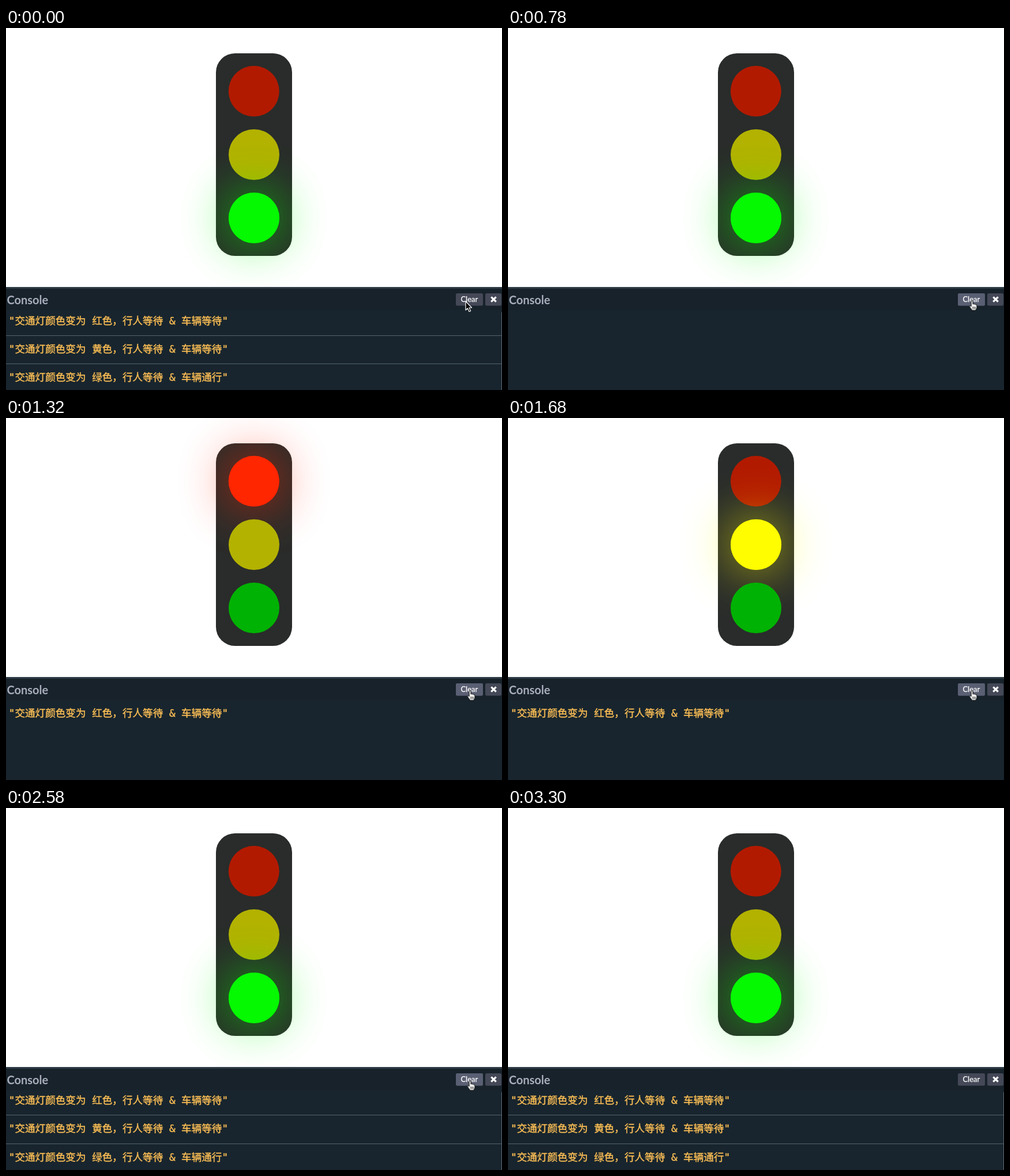
Write an HTML page that moves like this. It is 860 px wide and 629 px high and loops after 3.36 s.

```html
<!DOCTYPE html>
<html lang="zh-CN">
<head>
<meta charset="utf-8">
<title>交通灯</title>
<style>
  html, body { margin: 0; width: 100%; height: 100%; overflow: hidden; background: #fff; }
  svg { display: block; width: 860px; height: 629px; }

  .lamp circle { r: 44px; }
  .halo { filter: blur(44px); opacity: .75; }
  .red { fill: #ff2600; }
  .yellow { fill: #fffd00; }
  .green { fill: #05f900; }
  .off-red { fill: #b21a00; }
  .off-yellow { fill: #b3b200; }
  .off-green { fill: #00b203; }

  .title { font: 700 20px Lato, sans-serif; fill: #aaaebc; }
  .label { font: 400 13px Lato, sans-serif; fill: #fff; stroke: #fff; stroke-width: .25px; }
  .log text {
    font: 17.6px "DejaVu Sans Mono", "Noto Sans CJK SC", "Noto Sans CJK", monospace;
    fill: #f9bd55; stroke: #f9bd55; stroke-width: .4px;
  }
  .log .rule { fill: #55636c; }

  /* Every change is a hard cut; percentages are multiples of 60 ms in 3360 ms. */
  .cut { animation: 3360ms step-end infinite; }
  #red-on { animation-name: red-on; }
  #yellow-on { animation-name: yellow-on; }
  #green-on { animation-name: green-on; }
  #log1 { animation-name: log1; }
  #log2 { animation-name: log2; }
  #log3 { animation-name: log3; }
  #scroll { animation-name: scroll; }
  #hover { animation-name: hover; }
  #arrow { animation-name: arrow; }
  #hand { animation-name: hand; }

  @keyframes red-on { 0%, 50% { visibility: hidden } 25% { visibility: visible } }
  @keyframes yellow-on { 0%, 76.786% { visibility: hidden } 50% { visibility: visible } }
  @keyframes green-on { 0%, 76.786% { visibility: visible } 25% { visibility: hidden } }
  @keyframes log1 { 0%, 26.786% { visibility: visible } 8.929% { visibility: hidden } }
  @keyframes log2 { 0%, 51.786% { visibility: visible } 8.929% { visibility: hidden } }
  @keyframes log3 { 0%, 76.786% { visibility: visible } 8.929% { visibility: hidden } }
  @keyframes scroll {
    0% { transform: translateY(-4px) }
    8.929% { transform: none }
    76.786%, 100% { transform: translateY(-5px) }
  }
  @keyframes hover { 0%, 92.857% { visibility: hidden } 1.786% { visibility: visible } }
  @keyframes arrow {
    0% { visibility: visible; transform: translate(797px, 475px) }
    1.786% { visibility: hidden; transform: translate(797px, 475px) }
    92.857% { visibility: visible; transform: translate(760px, 505px) }
    94.643% { visibility: visible; transform: translate(703px, 542px) }
    96.429% { visibility: visible; transform: translate(650px, 562px) }
    98.214%, 100% { visibility: hidden; transform: translate(650px, 562px) }
  }
  @keyframes hand {
    0% { visibility: hidden; transform: translate(797px, 475px) }
    1.786% { visibility: visible; transform: translate(800px, 474px) }
    3.571% { visibility: visible; transform: translate(803px, 474px) }
    5.357% { visibility: visible; transform: translate(804.5px, 473.5px) }
    92.857%, 100% { visibility: hidden; transform: translate(804.5px, 473.5px) }
  }
</style>
</head>
<body>
<svg viewBox="0 0 860 629">
  <rect x="364" y="44" width="132" height="352" rx="33" fill="#292c2a"/>
  <g class="lamp" transform="translate(429.8 109.8)">
    <circle class="off-red"/>
    <g id="red-on" class="cut red"><circle class="halo"/><circle/></g>
  </g>
  <g class="lamp" transform="translate(430 220)">
    <circle class="off-yellow"/>
    <g id="yellow-on" class="cut yellow"><circle class="halo"/><circle/></g>
  </g>
  <g class="lamp" transform="translate(430 330)">
    <circle class="off-green"/>
    <g id="green-on" class="cut green"><circle class="halo"/><circle/></g>
  </g>

  <rect y="450" width="860" height="179" fill="#18252e"/>
  <rect y="450" width="860" height="40" fill="#17222b"/>
  <rect y="450" width="860" height="3" fill="#2f3b45"/>
  <text class="title" x="1.5" y="480">Console</text>

  <rect x="780" y="461" width="47" height="21.5" rx="2.5" fill="#444857"/>
  <rect id="hover" class="cut" x="780" y="461" width="47" height="21.5" rx="2.5" fill="#5a5f73"/>
  <text class="label" x="803.3" y="476" text-anchor="middle">Clear</text>
  <rect x="831" y="461" width="28" height="21.5" rx="2.5" fill="#444857"/>
  <path d="M841.3 467.3l8.4 8.4m0-8.4l-8.4 8.4" stroke="#fff" stroke-width="3.2"/>

  <g class="log">
    <g id="scroll" class="cut">
      <text id="log1" class="cut" x="4.8" y="518.8">"交通灯颜色变为 红色，行人等待 &amp; 车辆等待"</text>
      <g id="log2" class="cut">
        <rect class="rule" y="538" width="860" height="1"/>
        <text x="4.8" y="567.8">"交通灯颜色变为 黄色，行人等待 &amp; 车辆等待"</text>
      </g>
    </g>
    <g id="log3" class="cut">
      <rect class="rule" y="583" width="860" height="1"/>
      <text x="4.8" y="612.8">"交通灯颜色变为 绿色，行人等待 &amp; 车辆通行"</text>
      <rect x="859" y="494" width="1" height="135" fill="#5f6b74"/>
    </g>
  </g>

  <path id="arrow" class="cut" d="M0 0V15.2L3.4 12L6 17.8L8.6 16.6L6 11H10.6Z" fill="#000" stroke="#fff" stroke-width="1.2" stroke-linejoin="round"/>
  <g id="hand" class="cut" stroke="#000" stroke-linejoin="round" stroke-linecap="round">
    <path d="M-1.4 1.2Q0 -1 1.4 1.2V6.2Q3 5 4.2 6.6Q5.6 5.8 6.6 7.4Q8.4 7 8.4 9V12Q8.2 14 7 15.6V17H-.6V15.6Q-2.6 13.4-4.4 10.2Q-4 8-1.4 10Z" fill="#fff"/>
    <path d="M1.2 11v3.4M3.4 11v3.4M5.6 11v3.4" fill="none" stroke-width=".9"/>
  </g>
</svg>
</body>
</html>
```
